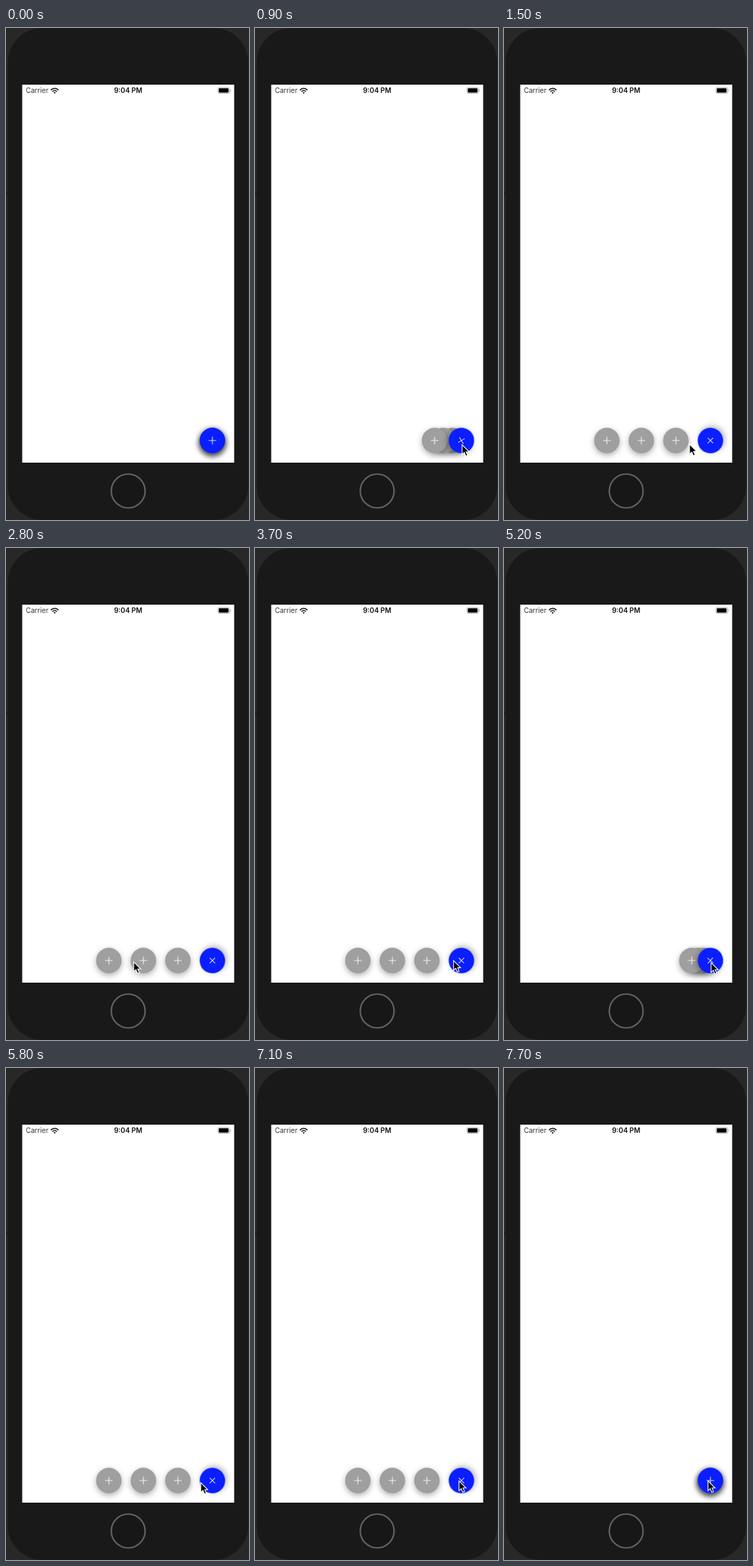
Recreate the animation shown at these times as an HTML page. Size 352 px wide and 712 px high, loop 7.8 s.

```html
<!DOCTYPE html>
<html lang="en">
<head>
<meta charset="utf-8">
<title>Expanding action button</title>
<style>
  html, body { margin: 0; width: 100%; height: 100%; overflow: hidden; background: #282828; }
  svg { display: block; }
  text { font: 10px Inter, "Liberation Sans", sans-serif; fill: #333; }
  .clock { font-weight: 600; fill: #111; text-anchor: middle; }
  .fab circle { fill: #9f9f9f; filter: drop-shadow(0 3px 4px rgba(0, 0, 0, .32)); }
  .fab path { stroke: #fff; stroke-opacity: .85; stroke-width: 1.1; }
  .main circle { fill: #0a1eff; }
</style>
</head>
<body>
<svg width="352" height="712">
  <defs>
    <g id="button"><circle r="18.5"/><path d="M-5.5 0H5.5M0 -5.5V5.5"/></g>
  </defs>
  <rect width="352" height="712" fill="#282828"/>
  <rect x="2.5" width="348.5" height="712" rx="50" fill="#191919"/>
  <path d="M0 239.5h3" stroke="#151515" stroke-width="2"/>
  <rect x="23.5" y="82" width="307" height="547" fill="#fff"/>
  <circle cx="177" cy="670" r="24.5" fill="#171717" stroke="#626262" stroke-width="2.2"/>

  <text x="28.7" y="94.3">Carrier</text>
  <text class="clock" x="177" y="94.3">9:04 PM</text>
  <path d="M65 89.8a7.5 7.5 0 0 1 11 0M67.2 92a4.8 4.8 0 0 1 6.6 0" fill="none" stroke="#222" stroke-width="1.7"/>
  <path d="M70.5 95.2l-1.6-1.7a2.4 2.4 0 0 1 3.2 0z" fill="#222"/>
  <rect x="306.8" y="86.2" width="17" height="8.4" rx="2.2" fill="none" stroke="#aaa" stroke-width=".9"/>
  <path d="M325 89v3" stroke="#aaa"/>
  <rect x="308.2" y="87.3" width="14.2" height="6.2" rx="1.1"/>

  <g id="fabs"></g>
  <path id="cursor" d="M0 0V14.2L3.2 11.2L5.5 16.5L8 15.4L5.8 10.3H10.2Z" stroke="#fff" stroke-width="1.1"/>
</svg>
<script>
const LOOP = 7800, TICK = 100;
const HOME = { x: 299, y: 597 }, SPACING = 50, ACTIONS = 3;
const TOGGLE = 500, toggles = [720, 3870, 5050, 7220]; // open, close, open, close
const GLIDE = 400, entry = { x: 334, y: 706 };
const stops = [ // the cursor leaves for each place at the given time
  { at: 300, x: 300, y: 603 },
  { at: 1360, x: 246, y: 602 },
  { at: 2250, x: 185, y: 599 },
  { at: 2810, x: 140, y: 599 },
  { at: 3350, x: 290, y: 597 },
  { at: 4600, x: 300, y: 600 },
  { at: 5758, x: 210, y: 600 },
  { at: 6400, x: 136, y: 600 },
  { at: 6700, x: 295.5, y: 597.5 }
];

const cursor = document.getElementById('cursor');
const layer = document.getElementById('fabs');
const progress = (t, start, length) => Math.min(1, Math.max(0, (t - start) / length));
const easeOut = p => 1 - (1 - p) ** 2;
const easeInOut = p => p < .5 ? 2 * p * p : 1 - 2 * (1 - p) ** 2;
const mix = (a, b, p) => a + (b - a) * p;

function addFab(kind) {
  const fab = document.createElementNS('http://www.w3.org/2000/svg', 'g');
  fab.setAttribute('class', kind);
  fab.append(...document.getElementById('button').cloneNode(true).children);
  layer.append(fab);
  return fab;
}
const actions = Array.from({ length: ACTIONS }, () => addFab('fab'));
const main = addFab('fab main');

function place(element, x, y, angle = 0) {
  element.setAttribute('transform', `translate(${x} ${y}) rotate(${angle})`);
}

function openness(t) {
  return toggles.reduce((sum, start, i) =>
    sum + (-1) ** i * easeInOut(progress(t, start, TOGGLE)), 0);
}

function cursorAt(t) {
  return stops.reduce((from, to) => {
    const p = easeOut(progress(t, to.at, GLIDE));
    return { x: mix(from.x, to.x, p), y: mix(from.y, to.y, p) };
  }, entry);
}

function draw(now) {
  const t = Math.floor(now % LOOP / TICK) * TICK;
  const open = openness(t), { x, y } = cursorAt(t);
  actions.forEach((fab, i) => place(fab, HOME.x - (i + 1) * SPACING * open, HOME.y));
  main.setAttribute('opacity', 1);
  place(main, HOME.x, HOME.y, 225 * open);
  place(cursor, x, y);
  cursor.style.display = t < stops[0].at ? 'none' : '';
  requestAnimationFrame(draw);
}
requestAnimationFrame(draw);
</script>
</body>
</html>
```
